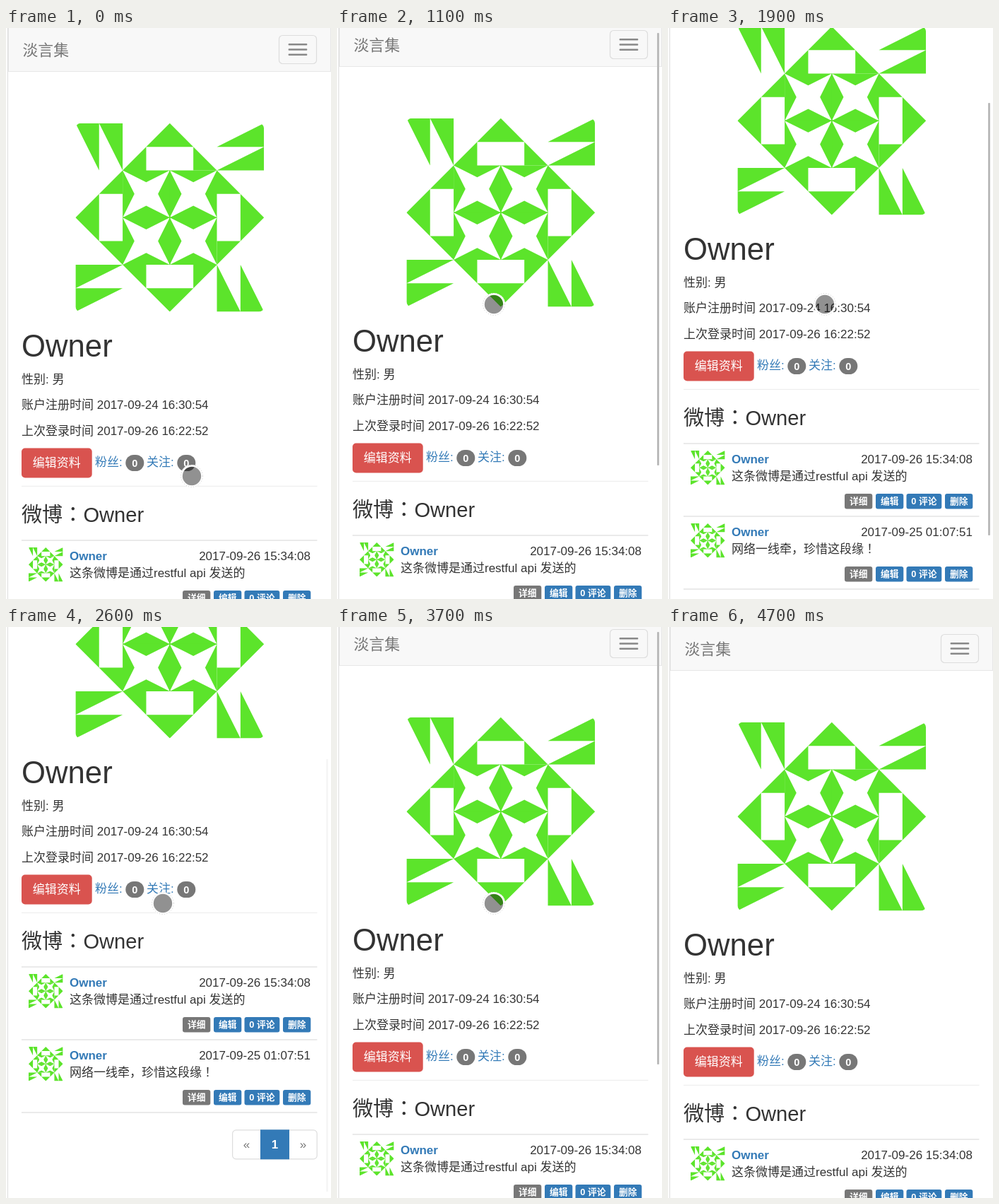
Recreate the animation shown at these times as an HTML page. Size 460 by 808 pixels, loop 6500 ms.

```html
<!DOCTYPE html>
<html lang="zh-CN">
<head>
<meta charset="utf-8">
<title>淡言集</title>
<style>
html, body { margin: 0; width: 100%; height: 100%; overflow: hidden; background: #fff; }
svg { display: block; width: 100%; height: 100%; }
text { font: 17px "Liberation Sans", "Noto Sans CJK SC", "Noto Sans CJK", sans-serif; fill: #333; }
.mark { font-family: "Noto Sans CJK JP", "Noto Sans CJK", sans-serif; }
text.brand { font-size: 21.86px; fill: #777; }
text.h1 { font-size: 43.7px; }
text.h3 { font-size: 29.14px; font-weight: 300; }
text.link { fill: #337ab7; }
text.name { fill: #337ab7; font-weight: 700; }
text.button { fill: #fff; font-weight: 500; }
text.badge { font-size: 14.57px; font-weight: 700; fill: #fff; }
text.label { font-size: 12.75px; font-weight: 700; fill: #fff; }
text.muted { fill: #777; }
text.bold { font-weight: 700; fill: #fff; }
</style>
</head>
<body>
<svg viewBox="0 0 460 808" xmlns="http://www.w3.org/2000/svg">
  <defs>
    <clipPath id="rounded"><rect width="4" height="4" rx=".11"/></clipPath>
    <g id="avatar" clip-path="url(#rounded)" fill="#5ce42b" fill-rule="evenodd"></g>
  </defs>
  <rect width="460" height="808" fill="#fff"/>
  <g id="page"></g>
  <rect x="2" width="1" height="808" fill="#ddd"/>
  <rect id="bar" x="453" width="3" height="612" rx="1" fill="#bbb"/>
  <g id="pointer">
    <circle r="14.6" fill="none" stroke="#fff" stroke-width="3"/>
    <circle r="15.4" fill="none" stroke="#888" stroke-opacity=".55" stroke-width=".8" stroke-dasharray="1 2.5"/>
    <circle r="13.2" fill="#000" fill-opacity=".43"/>
  </g>
</svg>
<script>
const $ = id => document.getElementById(id);
const USER = 'Owner', BLUE = '#337ab7', GRAY = '#777', RED = '#d9534f';

// Full-width punctuation is set centred in its cell.
const centreMarks = str => str.replace(/[：，！]/g, '<tspan class="mark" lang="ja">$&</tspan>');
const text = (cls, x, y, str, anchor = 'start') =>
  `<text class="${cls}" x="${x}" y="${y}" text-anchor="${anchor}">${centreMarks(str)}</text>`;
const rect = (x, y, w, h, fill, extra = '') =>
  `<rect x="${x}" y="${y}" width="${w}" height="${h}" fill="${fill}" ${extra}/>`;
const line = (y, color) => rect(22, y, 418.5, 1.2, color);
const avatar = (x, y, size) =>
  `<use href="#avatar" transform="translate(${x} ${y}) scale(${size / 4})"/>`;
const badge = x => rect(x, 604, 26, 23, GRAY, 'rx="11.5"') + text('badge', x + 13, 620.7, '0', 'middle');

// One quarter of the identicon on a 4 x 4 grid: corner, edge and star cell.
const quarter = 'M0 0H.5V1ZM.5 0H1V1ZM1 1 2 0 3 1H2.5V.5H1.5V1Z' +
  'M1 1H2.01V2.01H1ZM1 1 1.5 1.25 2 1 1.75 1.5 2 2 1.5 1.75 1 2 1.25 1.5Z';
$('avatar').innerHTML = [0, 90, 180, 270]
  .map(a => `<path d="${quarter}" transform="rotate(${a} 2 2)"/>`).join('');

function label(x, y, w, str, fill) {
  return rect(x, y + 71, w, 21.5, fill, 'rx="3"') + text('label', x + w / 2, y + 86.3, str, 'middle');
}

function post(y, date, body) {
  return line(y - .6, '#ddd') + avatar(32, y + 10, 48.6) +
    text('name', 90, y + 28, USER) + text('', 431, y + 28, date, 'end') + text('', 90, y + 52, body) +
    label(250, y, 39.3, '详细', GRAY) + label(294, y, 39.3, '编辑', BLUE) +
    label(337.5, y, 49.8, '0 评论', BLUE) + label(392, y, 39.3, '删除', BLUE);
}

$('page').innerHTML = [
  rect(3.5, -1, 456, 62.5, '#f8f8f8', 'stroke="#e7e7e7"'),
  text('brand', 23.5, 38.5, '淡言集'),
  rect(386.5, 10.5, 53, 40, 'none', 'rx="5" stroke="#ddd" stroke-width="1.2"'),
  ...[22, 29.3, 36.6].map(y => rect(399.6, y, 26.7, 2.4, '#888', 'rx="1"')),
  avatar(98.4, 134.8, 266.8),
  text('h1', 22, 465, USER),
  text('', 22, 503, '性别: 男'),
  text('', 22, 539, '账户注册时间 2017-09-24 16:30:54'),
  text('', 22, 576, '上次登录时间 2017-09-26 16:22:52'),
  rect(22, 594.5, 99.7, 42, RED, 'rx="5"'),
  text('button', 37.7, 621.3, '编辑资料'),
  text('link', 126, 620.3, '粉丝:'), badge(169.3),
  text('link', 199, 620.3, '关注:'), badge(242.3),
  line(647.8, '#eee'),
  text('h3', 22, 699, '微博：' + USER),
  post(725, '2017-09-26 15:34:08', '这条微博是通过restful api 发送的'),
  post(828, '2017-09-25 01:07:51', '网络一线牵，珍惜这段缘！'),
  line(930.4, '#ddd'),
  rect(320.6, 955.9, 119.6, 41, '#fff', 'rx="5" stroke="#ddd" stroke-width="1.2"'),
  rect(360, 955.3, 41, 42, BLUE),
  text('muted', 340.5, 982, '«', 'middle'),
  text('bold', 380.6, 982, '1', 'middle'),
  text('muted', 420.5, 982, '»', 'middle')
].join('');

const LOOP = 6500, STEP = 100, NOTCH = 200;
const clamp = v => Math.min(1, Math.max(0, v));
const mix = (a, b, p) => a + (b - a) * p;

// Each wheel notch: start time and scroll change.
const notches = [[1069, 123], [1856, 121], [3100, -121], [3531, -123]];
const scrollAt = t => Math.round(notches.reduce((sum, [start, delta]) =>
  sum + delta * (1 - Math.cos(Math.PI * clamp((t - start) / NOTCH))) / 2, 0));

// Each showing of the scrollbar: from, fade start, opacity left afterwards.
const showings = [[1100, 1700, 0], [1900, 2500, .14], [3200, 4200, 0]];
function barOpacity(t) {
  const last = showings.filter(([from]) => t >= from).pop();
  if (!last) return 0;
  const [, fade, rest] = last;
  return t < fade ? 1 : t < fade + STEP ? .5 : rest;
}

function pointerAt(t) {
  const enter = Math.sin(clamp(t / 400) * Math.PI / 2);
  const leave = clamp((t - 4300) / 300) ** 1.5;
  return [mix(mix(263, 222, enter), 66, leave), mix(mix(634, 391, enter), 470, leave)];
}

function render(now) {
  const t = Math.floor(now % LOOP / STEP) * STEP;
  const scroll = scrollAt(t);
  $('page').setAttribute('transform', `translate(0 ${-scroll})`);
  $('bar').setAttribute('y', Math.round(2 + scroll * 185 / 244));
  $('bar').setAttribute('opacity', barOpacity(t));
  $('pointer').setAttribute('transform', `translate(${pointerAt(t).map(Math.round)})`);
  $('pointer').setAttribute('visibility', t < 4700 ? 'visible' : 'hidden');
}

const begin = performance.now();
function tick() {
  render(performance.now() - begin);
  requestAnimationFrame(tick);
}
tick();
</script>
</body>
</html>
```
